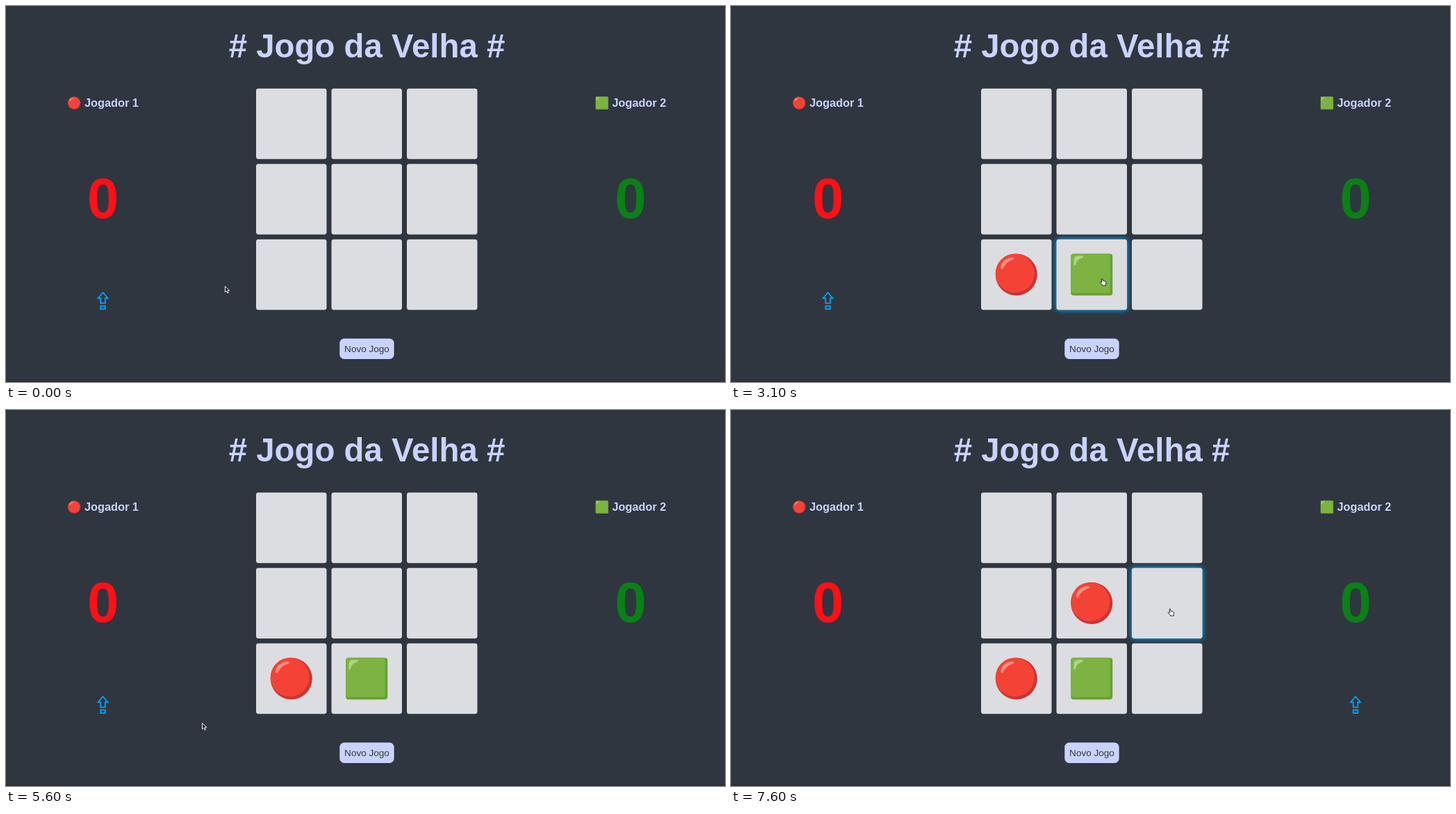
Recreate the animation shown at these times as an HTML page. Size 1035 by 541 pixels, loop 8000 ms.

```html
<!DOCTYPE html>
<html lang="pt">
<head>
<meta charset="utf-8">
<title>Jogo da Velha</title>
<style>
html, body { margin: 0; width: 100%; height: 100%; overflow: hidden; background: #2f3640; }
svg { display: block; }
text { font-family: "Liberation Sans", Arial, sans-serif; fill: #cad3ff; }
.bold { font-weight: bold; }
.mid { text-anchor: middle; }
</style>
</head>
<body>
<svg width="1035" height="541" viewBox="0 0 1035 541">
  <defs>
    <filter id="blur" x="-20%" y="-20%" width="140%" height="140%" color-interpolation-filters="sRGB">
      <feGaussianBlur stdDeviation="3.7"/>
    </filter>
    <!-- Pieces are centred on the origin and 120 units wide -->
    <g id="disc">
      <circle r="60" fill="#c33"/>
      <circle cx="-4" cy="-4" r="56" fill="#f44336"/>
      <path transform="translate(-64 -64)" fill="#ff8a80" d="M23.9 29.7c4.5-7.1 14.1-13 24.1-14.8 2.5-.4 5-.6 7.1.2 1.6.6 2.9 2.1 2 3.8-.7 1.4-2.6 2-4.1 2.5a44.6 44.6 0 0 0-23 17.4c-2 3-5 11.3-8.7 9.2-3.9-2.3-3.1-9.5 2.6-18.3z"/>
    </g>
    <g id="block">
      <rect x="-60" y="-60" width="120" height="120" rx="8" fill="#689f38"/>
      <rect x="-60" y="-60" width="113" height="113" rx="7.5" fill="#7cb342"/>
      <path transform="translate(-64.5 -64)" fill="#aed581" d="M40.2 12.9c0-2.3-1.6-3-10.8-2.7-7.7.3-11.5 1.2-13.8 4s-2.9 8.5-3 15.3c0 4.8 0 9.3 2.5 9.3 3.4 0 3.4-7.9 6.2-12.3 5.4-8.7 18.9-10.6 18.9-13.6z"/>
    </g>
  </defs>
  <rect y="539" width="1035" height="2" fill="#2a303a"/>
  <text class="bold mid" x="519.5" y="74" font-size="47.4"># Jogo da Velha #</text>

  <use href="#disc" transform="translate(98.3 139.7) scale(.153)"/>
  <text class="bold" x="113" y="145" font-size="16.3">Jogador 1</text>
  <text class="bold mid" x="139.5" y="305" font-size="81.3" style="fill:#ff1016">0</text>

  <use href="#block" transform="translate(858 139.7) scale(.153)"/>
  <text class="bold" x="872.5" y="145" font-size="16.3">Jogador 2</text>
  <text class="bold mid" x="899" y="305" font-size="81.3" style="fill:#0a8017">0</text>

  <path id="turn" fill="none" stroke="#00a8ff" stroke-width="1.7" d="M0 412.3L7 420.4H3.3V427.6H-3.3V420.4H-7ZM-3.3 431.6H3.3V436.2H-3.3Z"/>

  <rect id="glow" width="102.5" height="102.5" rx="4" fill="#00a8ff" filter="url(#blur)"/>
  <g id="board" fill="#dcdde1"></g>
  <g id="pieces"></g>

  <rect x="480.3" y="478.6" width="78.3" height="29.4" rx="6.5" fill="#cad3ff"/>
  <text class="mid" x="519.5" y="498" font-size="13.55" style="fill:#2f3640">Novo Jogo</text>

  <path id="arrow" fill="#20242b" stroke="#fff" stroke-width=".9" stroke-linejoin="round" d="M.5 .5V9L2.5 7.3L4 10.4L5.5 9.7L4.1 6.7H7Z"/>
  <path id="hand" fill="#fff" stroke="#111" stroke-width=".9" stroke-linejoin="round" d="M2.6 1.3Q3.3 0 4.1 1.3L4.7 4L8.2 4.9Q9.4 5.3 9.2 7L8.7 9V10.8H4L3.6 9.5L.7 6.6Q.6 5.2 2 5.7L3.2 6.5Z"/>
</svg>
<script>
const LOOP = 8000, STEP = 100, SIZE = 101.5, PITCH = 108.5, LEFT = 360, TOP = 118.7;
const $ = id => document.getElementById(id);
const svgNode = (parent, tag, attrs) => {
  const node = document.createElementNS("http://www.w3.org/2000/svg", tag);
  for (const key in attrs) node.setAttribute(key, attrs[key]);
  return parent.appendChild(node);
};
const cellX = col => LEFT + col * PITCH, cellY = row => TOP + row * PITCH;

for (let i = 0; i < 9; i++)
  svgNode($("board"), "rect", { x: cellX(i % 3), y: cellY(i / 3 | 0), width: SIZE, height: SIZE, rx: 3.4 });

// Clicks: time, column, row
const plays = [[1600, 0, 2], [3100, 1, 2], [6600, 1, 1]];
const pieces = plays.map(([, col, row], i) => svgNode($("pieces"), "use", {
  href: i % 2 ? "#block" : "#disc",
  transform: `translate(${cellX(col) + SIZE / 2} ${cellY(row) + SIZE / 2}) scale(.5)`
}));

// Pointer moves: first step, last step, destination
const moves = [
  [200, 200, 312, 404.5],
  [600, 900, 372, 398], [1000, 1300, 415, 392],
  [1800, 2000, 490, 391.5], [2100, 2200, 515, 391.5], [2300, 2500, 530.7, 391.2],
  [3400, 3500, 526.7, 377.5],
  [3800, 3900, 210, 430], [4100, 4200, 145.5, 405],
  [4400, 4400, 113.7, 423], [4500, 4600, 185.5, 453],
  [4800, 4900, 147, 384.3],
  [5100, 5100, 101, 421], [5200, 5200, 106, 426],
  [5400, 5400, 165, 450], [5500, 5500, 235, 457], [5600, 5600, 282, 450],
  [5800, 5800, 390, 459], [5900, 5900, 526, 400],
  [6100, 6200, 529.5, 291], [6400, 6400, 519, 282.3],
  [7100, 7200, 591, 269], [7400, 7600, 628.5, 285.3]
];

function pointerAt(t) {
  let x = 314.8, y = 402.7;
  for (const [first, last, toX, toY] of moves) {
    if (t < first) break;
    const p = Math.min(1, (t - first + STEP) / (last - first + STEP));
    x += (toX - x) * p;
    y += (toY - y) * p;
  }
  return [x, y];
}

const show = (node, on) => node.setAttribute("visibility", on ? "visible" : "hidden");
const place = (node, x, y) => node.setAttribute("transform", `translate(${x} ${y})`);
const inside = (v, start) => {
  const index = Math.floor((v - start) / PITCH);
  return index >= 0 && index < 3 && v - start - index * PITCH <= SIZE ? index : -1;
};

function draw(now) {
  const t = Math.floor((now % LOOP) / STEP) * STEP;
  const [x, y] = pointerAt(t);
  const col = inside(x + 3, LEFT), row = inside(y + 1, TOP), hover = col >= 0 && row >= 0;
  show($("glow"), hover);
  if (hover) place($("glow"), cellX(col) - .5, cellY(row) - .5);
  show($("hand"), hover);
  show($("arrow"), !hover);
  place($("hand"), x, y);
  place($("arrow"), x, y);

  const played = plays.filter(([time]) => t >= time).length;
  pieces.forEach((piece, i) => show(piece, i < played));
  place($("turn"), played % 2 ? 899 : 139.5, 0);
  requestAnimationFrame(draw);
}
requestAnimationFrame(draw);
</script>
</body>
</html>
```
